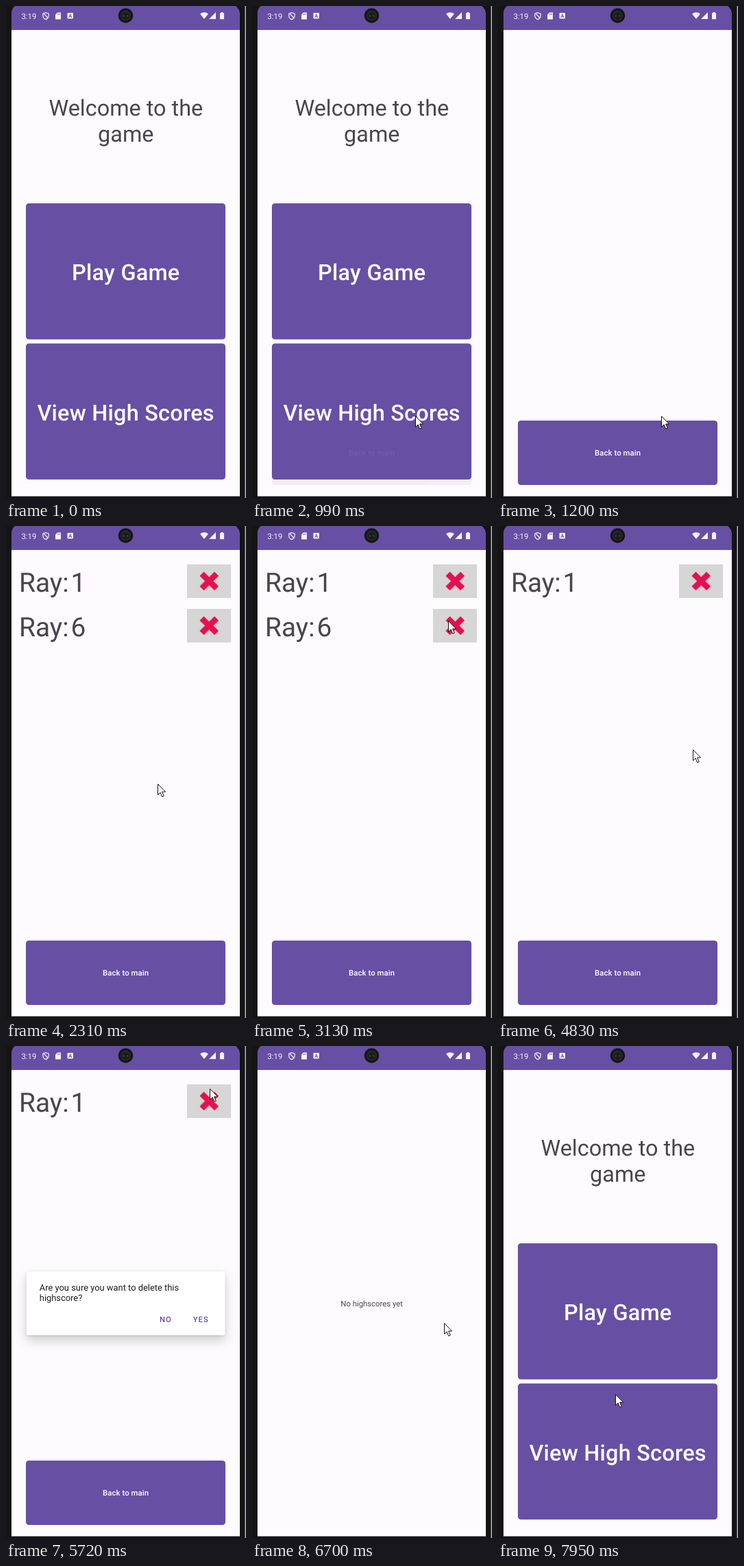
An HTML page for the animation above (8 s loop, 350 by 718 pixels).

```html
<!DOCTYPE html>
<html lang="en">
<head>
<meta charset="utf-8">
<title>High scores</title>
<style>
html, body { margin: 0; width: 100%; height: 100%; overflow: hidden; background: #111; }
svg { display: block; width: 100%; height: 100%; }
text { font: 400 11.34px Roboto, sans-serif; white-space: pre; text-rendering: geometricPrecision; }
.mid { text-anchor: middle; }
.btn { fill: #674fa3; }
.label { fill: #fff; font-weight: 500; letter-spacing: .00714em; }
.big { font-size: 32.4px; }
.ink { fill: #49454f; }
.row { font-size: 38.88px; fill: #49454f; }
.msg { font-size: 12.9px; fill: #1c1b1f; }
.act { font-weight: 500; letter-spacing: .0893em; fill: #674fa3; }
.card { fill: #fff; filter: drop-shadow(0 1px 2px #0000001c) drop-shadow(0 8px 8px #0000002c); }
.cross { stroke: #e60f4f; stroke-width: 8; }
.halo { stroke: #d58ea3; stroke-width: 9.5; }
.icon { fill: #f6f1fb; }
</style>
</head>
<body>
<svg viewBox="0 0 350 718" preserveAspectRatio="none">
  <defs>
    <path id="x" d="M285.5 69.8 307 91M307 69.8 285.5 91"/>
    <g id="del">
      <rect x="264" y="56" width="64" height="49" fill="#d6d6d6"/>
      <use href="#x" class="halo"/>
      <use href="#x" class="cross"/>
    </g>
  </defs>

  <!-- phone body and screen -->
  <rect width="350" height="718" fill="#141415"/>
  <rect x="348.5" width="1.5" height="718" fill="#b5b5b7"/>
  <rect x="8" y="35" width="333" height="680.5" fill="#fefbfe"/>
  <path class="btn" d="M8 35V9Q9 3 13 0H335Q340 4 341 10V35Z"/>

  <!-- status bar -->
  <text class="icon" x="22.5" y="18.7">3:19</text>
  <path d="M58 9.7 62.2 11.2V14.2Q62 18 58 19.6 54 18 53.8 14.2V11.2ZM55.5 11.5 61 17.5" fill="none" stroke="#f6f1fb" stroke-width="1.2"/>
  <path class="icon" d="M75 9.5H80V19.5H72V12.5Z"/>
  <path d="M75.2 11V13M76.8 11V13M78.4 11V13" stroke="#674fa3" stroke-width=".7"/>
  <rect class="icon" x="89.5" y="10" width="8.5" height="8.5" rx="1"/>
  <path d="M91.8 17 93.75 11.8 95.7 17M92.5 15.3H95" fill="none" stroke="#674fa3"/>
  <path class="icon" d="M283 11.5Q289 7 295 11.5L289 19ZM296 19 306 9V19ZM312 10.2H313.5V9H316.5V10.2H318V19.2H312Z"/>
  <circle cx="174.5" cy="14" r="10.7" fill="#151515"/>
  <circle cx="174.5" cy="14" r="7.5" fill="#272829"/>
  <circle cx="174.5" cy="14.5" r="5" fill="#18191c"/>
  <path d="M171 14.5H173M176 14.5H178" stroke="#505866" stroke-width="1.6"/>

  <g id="main">
    <text class="mid big ink" x="174.8" y="160">Welcome to the</text>
    <text class="mid big ink" x="174.8" y="198">game</text>
    <rect class="btn" x="29" y="288" width="291" height="198.5" rx="4.5"/>
    <rect class="btn" x="29" y="492.5" width="291" height="198.5" rx="4.5"/>
    <text class="mid big label" x="174.8" y="399.5">Play Game</text>
    <text class="mid big label" x="174.6" y="604.7">View High Scores</text>
  </g>

  <g id="back">
    <rect class="btn" x="29" y="605" width="291" height="94" rx="4.5"/>
    <text class="mid label" x="174.6" y="656">Back to main</text>
  </g>
  <g id="row1">
    <text class="row" x="19" y="95.5">Ray:</text>
    <text class="row" x="94.5" y="95.5">1</text>
    <use href="#del"/>
  </g>
  <g id="row2">
    <text class="row" x="19" y="160.5">Ray:</text>
    <text class="row" x="94.5" y="160.5">6</text>
    <use href="#del" y="65"/>
  </g>
  <text id="empty" class="mid ink" x="174.6" y="380">No highscores yet</text>

  <g id="dialog">
    <rect class="card" x="30" y="329" width="289.5" height="93" rx="2"/>
    <text class="msg" x="48.8" y="357">Are you sure you want to delete this</text>
    <text class="msg" x="48.8" y="372">highscore?</text>
    <text class="act" x="223.9" y="403.3">NO</text>
    <text class="act" x="272.7" y="403.3">YES</text>
  </g>

  <path id="cursor" d="M.5 .7V16.3L4.1 12.9 6.7 19.2 9.2 18.1 6.6 12H11.6Z" fill="#fff" stroke="#111"/>
</svg>
<script>
const LOOP = 8000, LEAD = 500, FADE = 140;
const el = id => document.getElementById(id);
const clamp = v => Math.max(0, Math.min(1, v));

// All times count from the moment the home screen opens, LEAD before the loop starts.
// Spans in which each part is shown, fades included.
const shown = {
  main: [[-FADE, 1650]],
  back: [[1480, 7180]],
  row1: [[1820, 7180]],
  row2: [[1820, 4880]],
  dialog: [[3720, 4740], [6050, 7060]],
  empty: [[7060, LOOP + FADE]]
};

// Pointer moves: start, end, x, y
const moves = [
  [280, 450, 171, 508],
  [1090, 1400, 238, 598],
  [2740, 2810, 221, 379],
  [2810, 2960, 247, 183],
  [3160, 3630, 286, 138],
  [3880, 4520, 280, 403],
  [5270, 5800, 299, 47],
  [5800, 5950, 297, 62],
  [6300, 6860, 280, 404]
];

const opacity = (t, spans) =>
  Math.max(...spans.map(([on, off]) => clamp(Math.min(t - on, off - t) / FADE)));

function pointer(t) {
  let x = 280, y = 404;
  for (const [from, to, toX, toY] of moves) {
    const k = 1 - (1 - clamp((t - from) / (to - from))) ** 2;
    x += (toX - x) * k;
    y += (toY - y) * k;
  }
  return `translate(${Math.round(x)} ${Math.round(y)})`;
}

function draw(t) {
  for (const id in shown) el(id).setAttribute("opacity", opacity(t, shown[id]));
  el("cursor").setAttribute("transform", pointer(t));
  el("cursor").setAttribute("opacity", t >= LEAD && t < 1090 ? 0 : 1);
}

const start = performance.now();
function tick() {
  draw((performance.now() - start + LEAD) % LOOP);
  requestAnimationFrame(tick);
}
tick();
</script>
</body>
</html>
```
